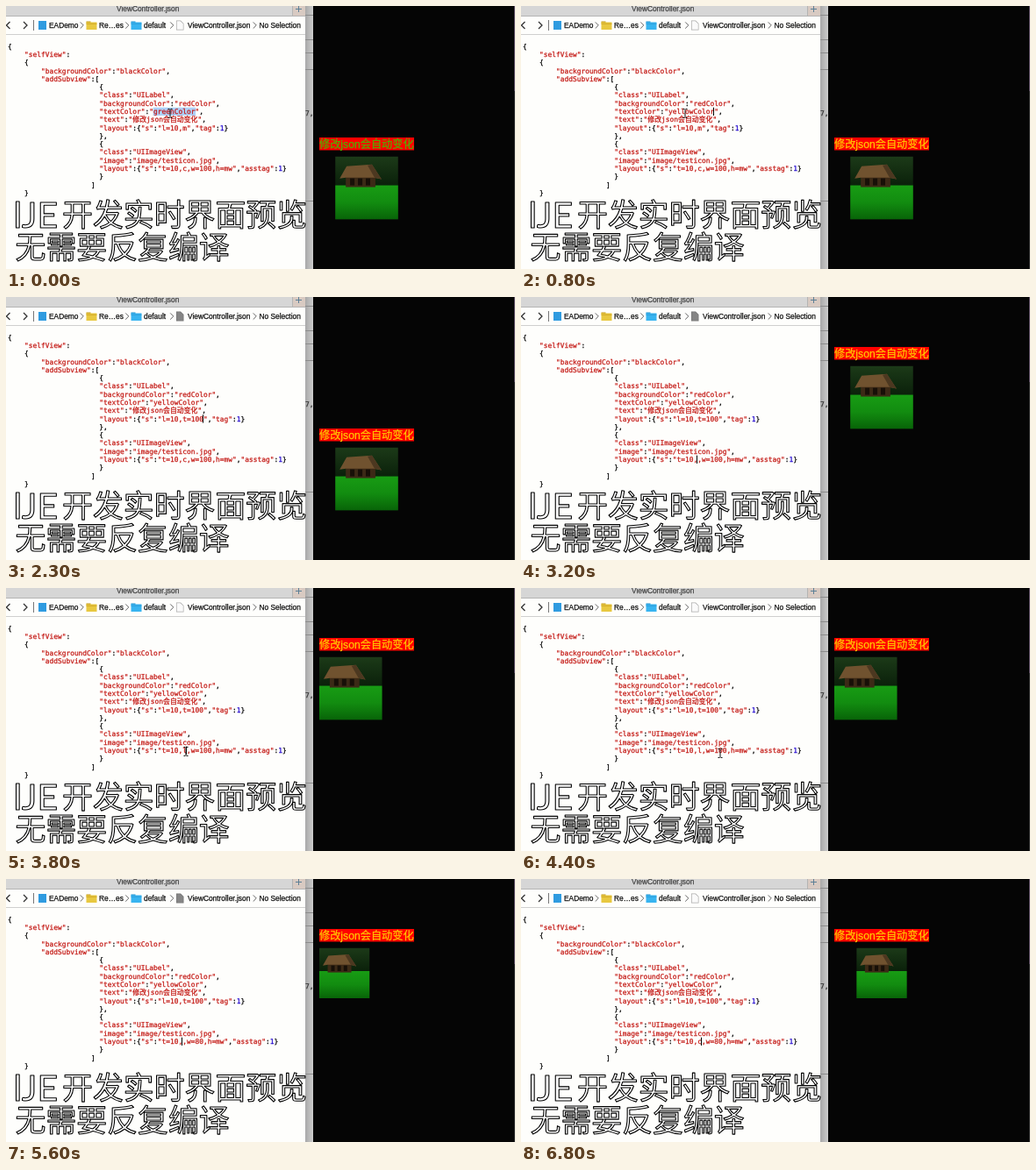
An HTML page with a canvas for the animation above (6900 ms loop, 580 by 300 pixels).

```html
<!DOCTYPE html>
<html lang="zh">
<head>
<meta charset="utf-8">
<style>
  html, body { margin: 0; width: 100%; height: 100%; overflow: hidden; background: #fff; }
  canvas { display: block; }
</style>
</head>
<body>
<canvas id="stage" width="580" height="300"></canvas>
<script>
const ctx = document.getElementById('stage').getContext('2d');
const LOOP = 6900, STEP = 100;
const CODE = '7.88px "DejaVu Sans Mono", "Noto Sans CJK SC", monospace';
const UI = '8.35px "Liberation Sans", sans-serif';
const CJK = '"Noto Sans CJK SC", sans-serif';
const CHAR = 4.744, LINE = 9.28, TOP = 48.8;
const MESSAGE = '修改json会自动变化';

function box(x, y, w, h, color) {
  ctx.fillStyle = color;
  ctx.fillRect(x, y, w, h);
}

function poly(color, ...points) {
  ctx.fillStyle = color;
  ctx.beginPath();
  points.forEach(([x, y]) => ctx.lineTo(x, y));
  ctx.fill();
}

// A hairline stroke gives small type a little more weight
function text(s, x, y, font, color) {
  ctx.font = font;
  ctx.fillStyle = ctx.strokeStyle = color;
  ctx.lineWidth = 0.25;
  ctx.fillText(s, x, y);
  ctx.strokeText(s, x, y);
}

function chevron(x, y, size, dir, color, weight = 1) {
  ctx.strokeStyle = color;
  ctx.lineWidth = weight;
  ctx.beginPath();
  ctx.moveTo(x - dir * size / 2, y - size);
  ctx.lineTo(x + dir * size / 2, y);
  ctx.lineTo(x - dir * size / 2, y + size);
  ctx.stroke();
}

function fade(x0, y0, x1, y1, ...colors) {
  const g = ctx.createLinearGradient(x0, y0, x1, y1);
  colors.forEach((c, i) => g.addColorStop(i / (colors.length - 1), c));
  return g;
}

// Value of the last [start, value] entry that has begun
const at = (t, ...keys) => keys.filter(k => k[0] <= t).pop()[1];

function stateAt(t) {
  const typed = (s, start, rate) => s.slice(0, Math.max(0, Math.floor((t - start) / STEP) * rate));
  const s = {
    color: t < 100 ? 'greenColor' : typed('yellowColor', 0, 2),
    top: t < 1500 ? 'm' : typed('t=100', 1600, 1),
    align: at(t, [0, 'c'], [3100, ''], [3400, 'l'], [5500, ''], [5900, 'c']),
    width: at(t, [0, '100'], [4700, ''], [4800, '8'], [4900, '80']),
    ink: t < 700 ? '#50b000' : '#ffc800',
    labelY: t < 2600 ? 150 : 57,
    size: t < 5000 ? 71.5 : 57.2,
    centred: t < 3600 || t >= 6100,
    unsaved: at(t, [0, false], [100, true], [700, false], [1500, true], [2600, false],
      [3100, true], [3600, false], [4700, true], [5000, false], [5500, true], [6100, false])
  };
  const colorEnd = 13 + s.color.length, topEnd = 20 + s.top.length;
  const alignEnd = 20 + s.align.length, widthStart = alignEnd + 3;
  s.caret = at(t, [0, null], [100, [8, colorEnd]], [1400, [10, topEnd]],
    [3000, [15, alignEnd]], [4300, null], [4700, [15, widthStart + s.width.length]],
    [5300, [15, alignEnd]]);
  s.selection = t < 100 ? [8, 13, 10] : t >= 4500 && t < 4700 ? [15, widthStart, 3] : null;
  return s;
}

function pointerAt(t) {
  const glide = (a, b, from, to) => {
    const k = Math.min(1, Math.max(0, (t - from) / (to - from)));
    const e = k * k * (3 - 2 * k);
    return a.map((v, i) => v + (b[i] - v) * e);
  };
  if (t < 1500) return glide([187, 122], [205, 139], 900, 1400);
  if (t >= 2600 && t < 3100) return glide([205, 139], [205, 186], 2600, 3000);
  if (t >= 3800 && t < 4700) return glide([205, 186], [227, 188], 3800, 4300);
  if (t >= 5000 && t < 5500) return glide([227, 188], [205, 186], 5000, 5300);
  return null;
}

function folder(x, color, tab) {
  box(x, 17.5, 5, 2, tab);
  box(x, 18.5, 12, 8.5, color);
  box(x, 19.8, 12, 0.8, tab);
}

function drawChrome(unsaved) {
  box(0, 0, 580, 300, '#fefefc');
  box(0, 0, 341, 11, '#d6d6d6');
  box(0, 11, 341, 1, '#b4b4b4');
  text('ViewController.json', 126, 6, UI, '#444');
  box(327, 0, 14, 11, '#d8cac2');
  box(326, 0, 1, 11, '#b4b4b4');
  box(330, 3, 7, 1, '#5c7f96');
  box(333, 0, 1, 7, '#5c7f96');
  box(0, 32, 341, 1, '#cfcfcf');

  chevron(2.5, 22, 4, -1, '#333', 1.3);
  chevron(22, 22, 4, 1, '#333', 1.3);
  box(31, 16, 1, 12, '#777');
  box(37, 17, 9, 10, '#2f9be0');
  folder(91.5, '#e8c840', '#c8a020');
  folder(142.5, '#38b4f0', '#2898d4');
  poly(unsaved ? '#777' : '#aaa', [194, 16.5], [199, 16.5], [202.5, 20], [202.5, 27.5], [194, 27.5]);
  poly(unsaved ? '#858585' : '#fafafa',
    [194.7, 17.2], [198.6, 17.2], [201.8, 20.3], [201.8, 26.8], [194.7, 26.8]);
  [['EADemo', 49], ['Re…es', 106], ['default', 157], ['ViewController.json', 207], ['No Selection', 288.5]]
    .forEach(([s, x]) => text(s, x, 25, UI, '#111'));
  [86.5, 138, 189, 283.5].forEach(x => chevron(x, 22, 3.6, 1, '#666'));

  // Sliver of the window behind, in this window's shadow
  box(341, 0, 9, 300, fade(341, 0, 350, 0, '#a8a8a8', '#cccccc'));
  [10, 38, 53, 72, 222].forEach(y => box(341, y, 9, 1, '#8c8c8c'));
  text('7,', 341, 125, CODE, '#333');
}

function drawCode(s) {
  const lines = [
    [0, '{'], [4, '"selfView":'], [4, '{'],
    [8, '"backgroundColor":"blackColor",'], [8, '"addSubview":['],
    [22, '{'], [22, '"class":"UILabel",'], [22, '"backgroundColor":"redColor",'],
    [22, `"textColor":"${s.color}",`], [22, `"text":"${MESSAGE}",`],
    [22, `"layout":{"s":"l=10,${s.top}","tag":1}`], [22, '},'],
    [22, '{'], [22, '"class":"UIImageView",'], [22, '"image":"image/testicon.jpg",'],
    [22, `"layout":{"s":"t=10,${s.align},w=${s.width},h=mw","asstag":1}`],
    [22, '}'], [20, ']'], [4, '}']
  ];
  if (s.selection) {
    const [row, col, n] = s.selection;
    box(106 + col * CHAR, TOP + row * LINE - 7.3, n * CHAR + 1, LINE, '#aed0f8');
  }
  lines.forEach(([indent, line], row) => {
    let x = 2 + indent * CHAR;
    for (const part of line.split(/("[^"]*"|\d)/).filter(Boolean)) {
      const color = part[0] === '"' ? '#c41a16' : /\d/.test(part) ? '#1c00cf' : '#000';
      text(part, x, TOP + row * LINE, CODE, color);
      x += ctx.measureText(part).width;
    }
  });
  if (s.caret) {
    const [row, col] = s.caret;
    box(Math.round(105.6 + col * CHAR), TOP + row * LINE - 7.3, 1, LINE, '#000');
  }
}

function drawPhoto(x, y, size) {
  ctx.save();
  ctx.translate(x, y);
  ctx.scale(size / 72, size / 72);
  box(0, 0, 72, 72, fade(0, 0, 0, 34, '#1c3a18', '#0a200a'));
  box(0, 33, 72, 39, fade(0, 33, 0, 72, '#189c14', '#128c10', '#086408'));
  box(12, 22, 34, 13, '#3c2a16');
  [17, 26, 35].forEach(px => box(px, 25, 5, 8, '#181008'));
  poly('#70522f', [5, 25], [13, 11], [42, 9], [53, 26], [44, 24], [12, 24]);
  poly('#4c3820', [42, 9], [53, 26], [45, 24], [37, 10]);
  ctx.restore();
}

function drawPhone(s) {
  box(350, 0, 230, 300, '#050505');
  box(579, 0, 1, 97, '#6a5a70');
  box(579, 97, 1, 203, '#3c3c3c');
  box(357, s.labelY, 108, 14.5, '#f00');
  text(MESSAGE, 357, s.labelY + 11.5, `12.2px "Liberation Sans", ${CJK}`, s.ink);
  drawPhoto(s.centred ? 411 - s.size / 2 : 357, s.labelY + 21.8, s.size);
}

function drawPointer(p) {
  if (!p) return;
  const [x, y] = p;
  box(x - 0.5, y - 4, 1, 9, '#111');
  [-5, 5].forEach(dy => {
    box(x - 2.5, y + dy, 2, 1, '#111');
    box(x + 0.5, y + dy, 2, 1, '#111');
  });
}

function outlined(s, x, y, font) {
  ctx.font = font;
  ctx.lineJoin = 'round';
  ctx.lineWidth = 1.1;
  ctx.fillStyle = '#fff';
  ctx.fillText(s, x, y);
  ctx.strokeStyle = '#000';
  ctx.strokeText(s, x, y);
}

function frame(now) {
  const t = Math.floor(now % LOOP / STEP) * STEP;
  const s = stateAt(t);
  drawChrome(s.unsaved);
  drawCode(s);
  drawPhone(s);
  drawPointer(pointerAt(t));
  outlined('lJE', 8.5, 252.5, '41px Lato, sans-serif');
  outlined('开发实时界面预览', 64, 250.8, `34.9px ${CJK}`);
  outlined('无需要反复编译', 10.5, 288.3, `34.9px ${CJK}`);
  requestAnimationFrame(frame);
}
requestAnimationFrame(frame);
</script>
</body>
</html>
```
